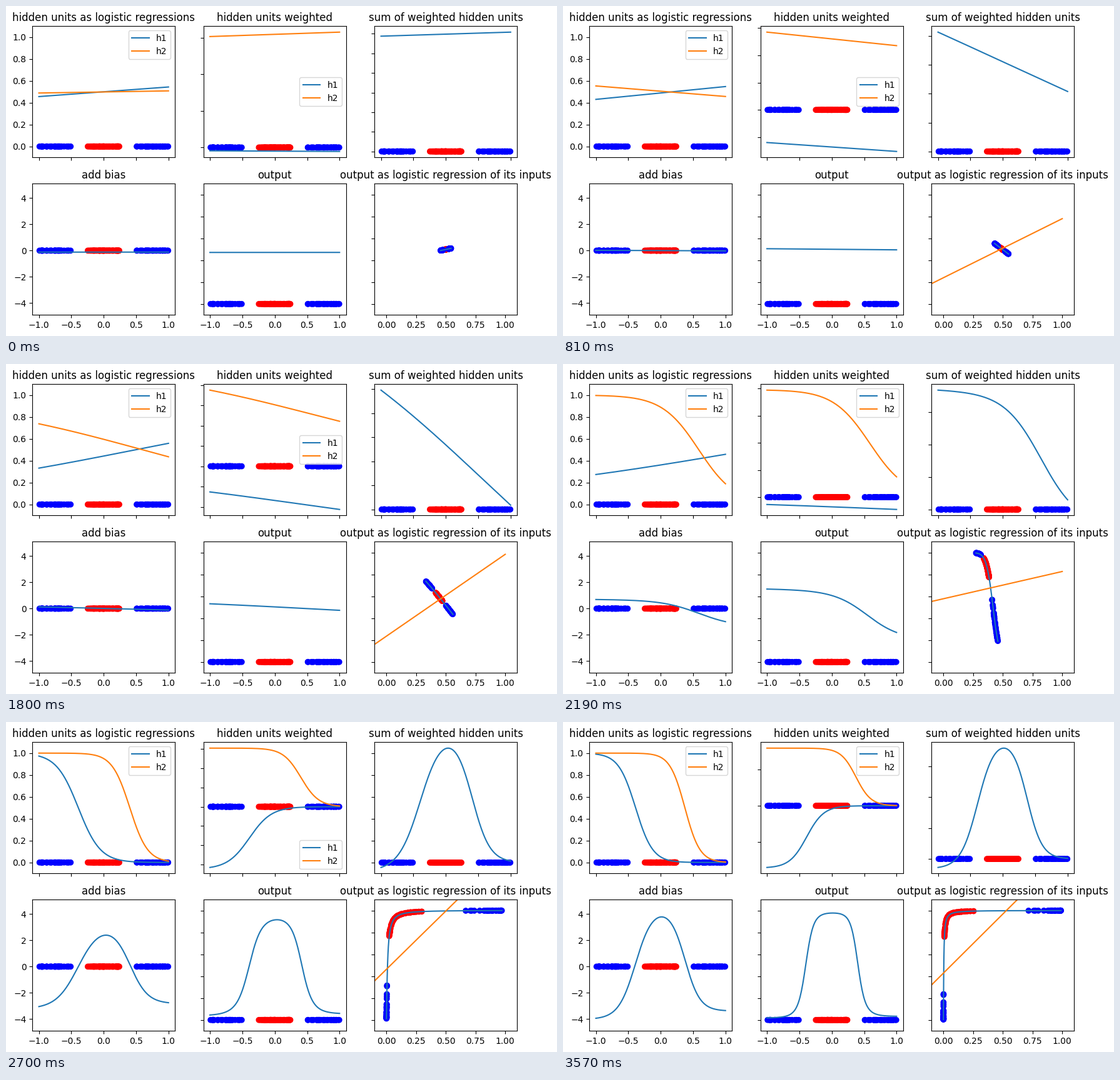
Write a matplotlib script that moves like this. It is 881x528 px and loops after 3.6 s.

```python
import numpy as np
import matplotlib.pyplot as plt
from matplotlib.animation import FuncAnimation

W, H, DPI = 881, 528, 100
FRAMES, INTERVAL = 120, 30
BIAS_RATE = 5

TITLES = ["hidden units as logistic regressions", "hidden units weighted",
          "sum of weighted hidden units", "add bias", "output",
          "output as logistic regression of its inputs"]


def sigmoid(z):
    return 1 / (1 + np.exp(-z))


def surge(t, jump, mid, width, growth=0):
    """A smooth step around mid, then steady growth per frame."""
    u = (t - mid) / width
    return jump * sigmoid(u) + growth * width * np.log1p(np.exp(u))


def hidden_params(t):
    """Slope and offset of both hidden units."""
    w1 = .176 + 8.2e-5 * t ** 2 + surge(t, -7.67, 84.5, 3.2, -.0357)
    b1 = -6e-5 * t ** 2 + surge(t, -2.08, 81.65, 4.35)
    w2 = .039 - .0086 * t + surge(t, -6.05, 73.4, 3.75, -.035)
    b2 = -.006 + .001 * t + surge(t, 2.71, 68.7, 4.4, .008)
    return w1, b1, w2, b2


def output_weights(t):
    settling = np.exp(-2 * t)
    v1 = .058 - .0073 * t - .06 * settling + surge(t, -5.8, 84, 1.9, -.055)
    v2 = .074 + .0068 * t - .012 * settling + surge(t, 4.68, 75.7, 3, .054)
    return v1, v2


def units(x, t):
    w1, b1, w2, b2 = hidden_params(t)
    return sigmoid(w1 * x + b1), sigmoid(w2 * x + b2)


rng = np.random.default_rng(4)


def sample(lo, hi, n):
    return np.concatenate([[lo, hi], rng.uniform(lo, hi, n - 2)])


reds = sample(-.245, .24, 70)
blues = np.concatenate([sample(-.99, -.51, 35), sample(.51, .995, 35)])
points = np.concatenate([reds, blues])
labels = np.repeat([1, 0], [len(reds), len(blues)])
xs = np.linspace(-1, 1, 200)


def train_bias(c):
    """Gradient descent on the output bias, one step per frame."""
    path = []
    for t in range(FRAMES):
        path.append(c)
        (h1, h2), (v1, v2) = units(points, t), output_weights(t)
        c += BIAS_RATE * np.mean(labels - sigmoid(v1 * h1 + v2 * h2 + c))
    return path


biases = train_bias(-.145)

# The tiny extra keeps the pixel size from being truncated downwards.
fig = plt.figure(figsize=(W / DPI + 1e-9, H / DPI + 1e-9), dpi=DPI)


def make_panel(k):
    row, col = divmod(k, 3)
    left, bottom = 42.2 + 273.53 * col, 33.75 + 252 * (1 - row)
    ax = fig.add_axes([left / W, bottom / H, 227.94 / W, 210 / H])
    ax.set_title(TITLES[k])
    ax.tick_params(labelleft=col == 0, labelbottom=row == 1)
    ax.set_xlim(-1.1, 1.1)
    ax.set_ylim(-.1, 1.1)
    dots = ax.scatter(points, 0 * points,
                      c=np.where(labels == 1, "red", "blue"))
    return ax, dots


panels = [make_panel(k) for k in range(6)]
axes = [ax for ax, _ in panels]
cloud = panels[5][1]
axes[3].set_ylim(-4.9, 5.1)
axes[5].set_xlim(-.1, 1.1)


def add_line(k, label=None):
    return axes[k].plot(xs, 0 * xs, label=label)[0]


hidden = [add_line(0, "h1"), add_line(0, "h2")]
weighted = [add_line(1, "h1"), add_line(1, "h2")]
total, biased, output, curve, border = [add_line(k) for k in (2, 3, 4, 5, 5)]
axes[0].legend(loc="upper right")
axes[1].legend(loc="best")


def fit_y(ax, *data):
    lo = min(0, *(d.min() for d in data))
    hi = max(0, *(d.max() for d in data))
    pad = .05 * (hi - lo)
    ax.set_ylim(lo - pad, hi + pad)


def update(t):
    h1, h2 = units(xs, t)
    v1, v2 = output_weights(t)
    c = biases[t]
    g1, g2 = v1 * h1, v2 * h2
    s = g1 + g2
    lines = hidden + weighted + [total, biased, output]
    for line, y in zip(lines, (h1, h2, g1, g2, s, s + c, sigmoid(s + c))):
        line.set_ydata(y)
    fit_y(axes[1], g1, g2)
    fit_y(axes[2], s, s)
    curve.set_data(h1, h2)
    border.set_ydata(-(c + v1 * xs) / v2)
    cloud.set_offsets(np.column_stack(units(points, t)))
    return lines + [curve, border, cloud]


anim = FuncAnimation(fig, update, frames=FRAMES, interval=INTERVAL,
                     init_func=lambda: update(0), repeat=True, blit=False)
plt.show()
```
